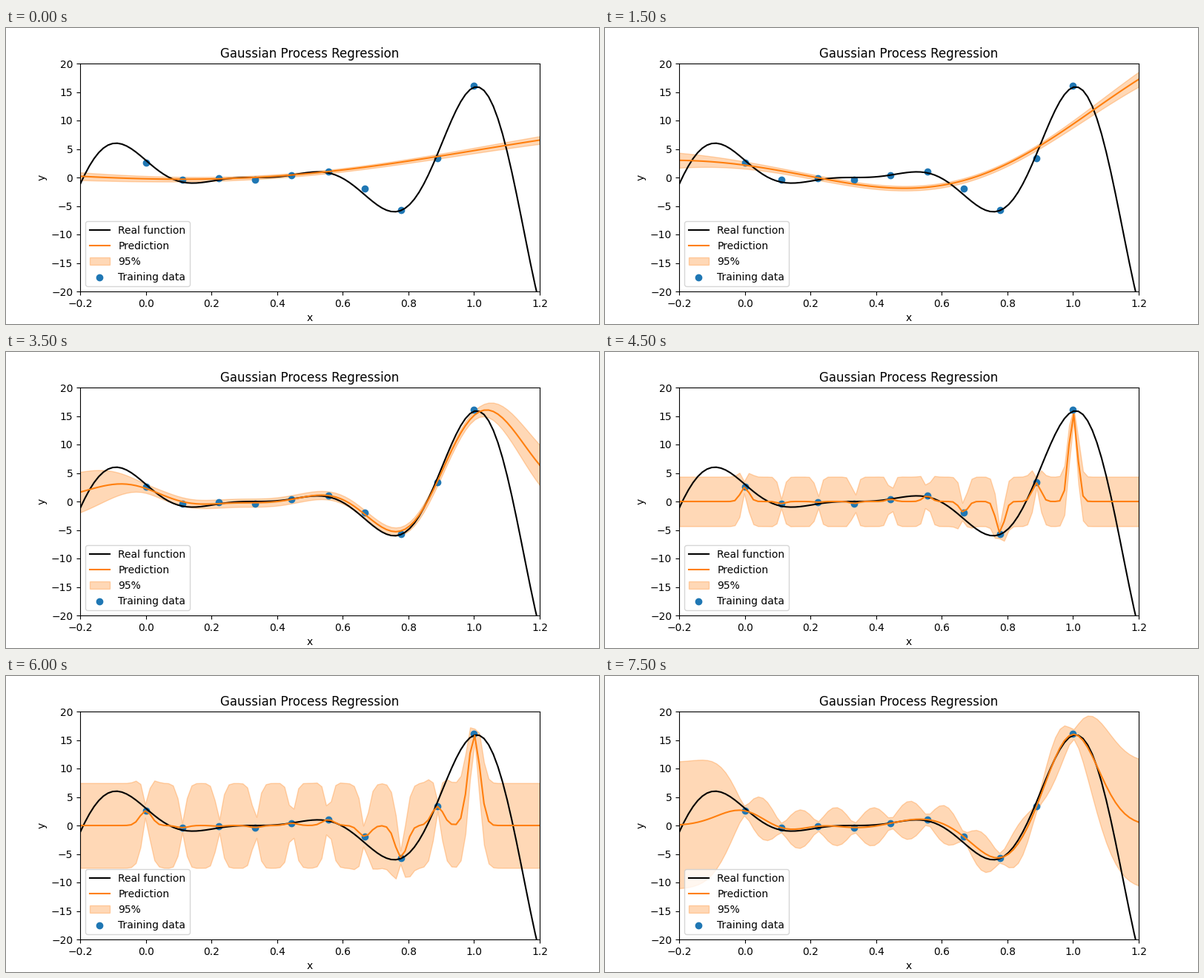
A matplotlib script for the animation above (8000 ms loop, 800x400 px).

```python
import numpy as np
import matplotlib.pyplot as plt
from matplotlib.animation import FuncAnimation

FRAMES, INTERVAL = 16, 500
NOISE = 0.43

# (step, kernel length, kernel amplitude); log-interpolated in between
PATH = [(0, 1.0, 1.07), (3, 0.63, 2.43), (5, 10, 19.5), (7, 0.133, 1.97),
        (9, 0.0129, 2.22), (12, 0.018, 3.8), (15, 0.0775, 5.69)]

x = np.linspace(-0.2, 1.2, 100)
xt = np.linspace(0, 1, 10)
yt = np.array([2.6, -0.39, -0.13, -0.36, 0.4, 1.04, -1.95, -5.7, 3.38, 16.1])


def real(t):
    return (6 * t - 2) ** 2 * np.sin(12 * t - 4)


def kernel(a, b, length, sigma):
    d = (a[:, None] - b[None, :]) / length
    return sigma ** 2 * np.exp(-d ** 2 / 2)


def hyperparameters(i):
    steps, *params = np.array(PATH).T
    return [np.exp(np.interp(i, steps, np.log(p))) for p in params]


def posterior(i):
    """Mean and 95% half-width of the prediction at step i."""
    length, sigma = hyperparameters(i)
    k = kernel(xt, xt, length, sigma) + NOISE ** 2 * np.eye(len(xt))
    ks = kernel(x, xt, length, sigma)
    weights = np.linalg.solve(k, ks.T)
    var = sigma ** 2 - np.sum(ks * weights.T, axis=1)
    return yt @ weights, 1.96 * np.sqrt(np.maximum(var, 0))


fig, ax = plt.subplots(figsize=(8, 4), dpi=100)
mean, half = posterior(0)
ax.plot(x, real(x), color="black", label="Real function")
line, = ax.plot(x, mean, color="tab:orange", label="Prediction")
band = ax.fill_between(x, mean - half, mean + half, color="tab:orange",
                       alpha=0.3, label="95%")
ax.scatter(xt, yt, color="tab:blue", label="Training data")
ax.set(xlim=(-0.2, 1.2), ylim=(-20, 20), xlabel="x", ylabel="y",
       title="Gaussian Process Regression")
ax.legend(loc="lower left")


def update(i):
    mean, half = posterior(i)
    line.set_ydata(mean)
    lower = np.column_stack([x, mean - half])
    upper = np.column_stack([x, mean + half])
    band.set_verts([np.vstack([lower, upper[::-1]])])
    return line, band


anim = FuncAnimation(fig, update, frames=FRAMES, interval=INTERVAL,
                     repeat=True, repeat_delay=0)
plt.show()
```
